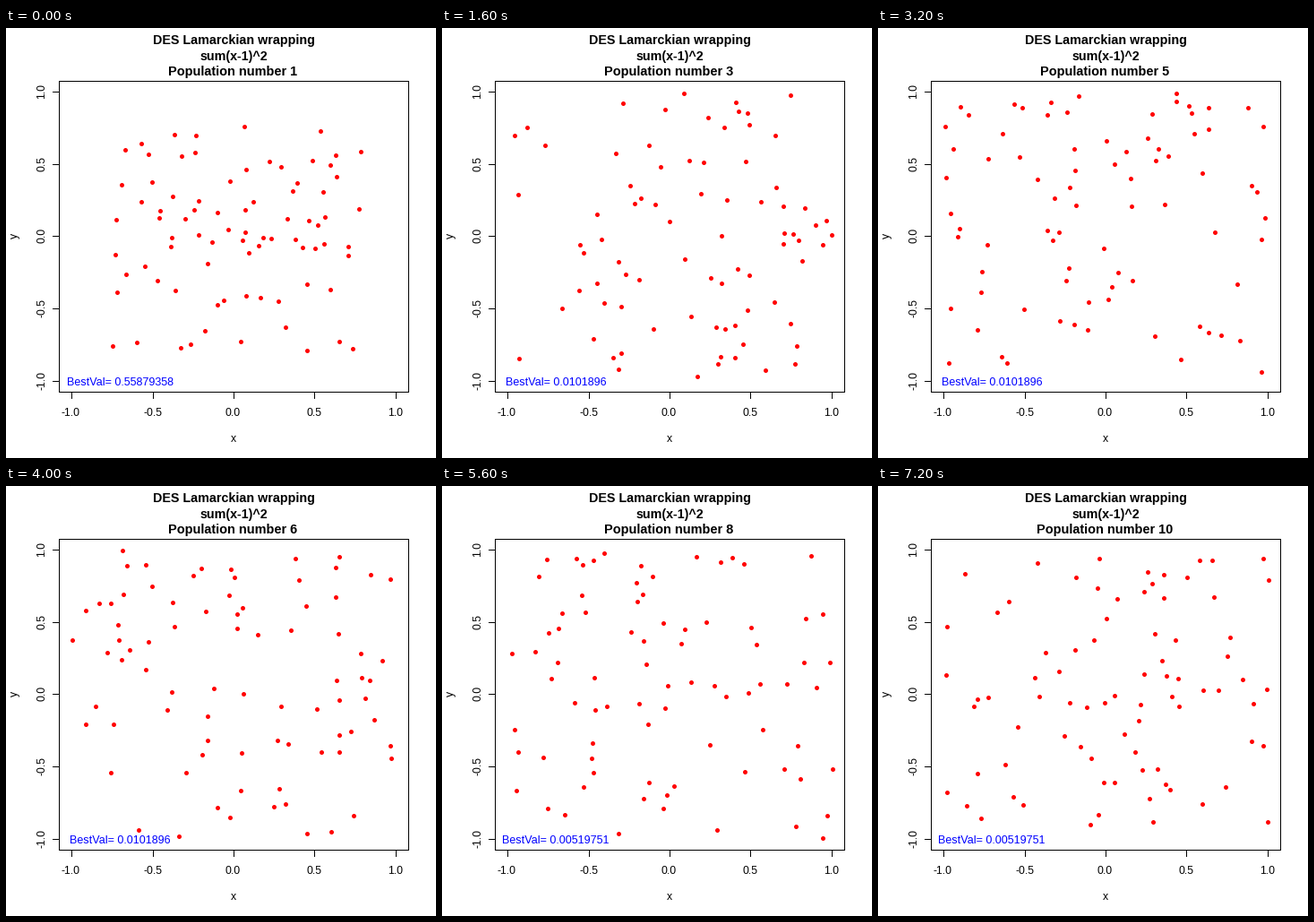
These frames come from a looping animation (480x480 px, 8000 ms). A matplotlib script:

```python
import math
import random

import matplotlib.pyplot as plt
from matplotlib.animation import FuncAnimation

SIZE = 480
PT = 0.72  # points per pixel at 100 dpi
FONT = "Liberation Sans"
LEFT, RIGHT, TOP, BOTTOM = 59, 449, 59, 406
COUNT = 80
GAP = 0.05  # least distance between individuals

# Population number at which each new best value appears.
RECORDS = {1: "0.55879358", 2: "0.11486806", 3: "0.0101896", 7: "0.00519751"}


def px_x(x):
    return round(254 + 181 * x)


def px_y(y):
    return round(232.5 - 161.2 * y)


def best_value(number):
    return RECORDS[max(n for n in RECORDS if n <= number)]


def population(number):
    """Scatter one population evenly, leaning slightly towards (1, 1)."""
    rng = random.Random(number)
    reach = 0.79 if number == 1 else 1.0

    def coord():
        return reach * (2 * rng.random() ** 0.9 - 1)

    points = []
    while len(points) < COUNT:
        point = coord(), coord()
        if all(math.dist(point, p) > GAP for p in points):
            points.append(point)
    return [px_x(x) + 0.5 for x, _ in points], [px_y(y) + 0.5 for _, y in points]


fig = plt.figure(figsize=(4.8, 4.8), dpi=100, facecolor="white")
ax = fig.add_axes([0, 0, 1, 1])
ax.set_xlim(0, SIZE)
ax.set_ylim(SIZE, 0)
ax.axis("off")


def line(xs, ys):
    # Snapping moves whole coordinates to the pixel centre.
    ax.plot(xs, ys, color="black", lw=PT, antialiased=False, snap=True,
            solid_capstyle="projecting", solid_joinstyle="miter")


def label(x, y, text, size=12.2, **style):
    return ax.text(x, y, text, fontsize=size * PT, family=FONT, ha="center",
                   va="baseline", rotation_mode="anchor", **style)


line((LEFT, RIGHT, RIGHT, LEFT, LEFT), (TOP, TOP, BOTTOM, BOTTOM, TOP))
for step in range(-2, 3):
    value = step / 2
    x, y = px_x(value), px_y(value)
    line((x, x), (BOTTOM, BOTTOM + 7))
    line((LEFT - 7, LEFT), (y, y))
    label(x - 0.5, 433, f"{value:.1f}")
    label(43, y - 0.5, f"{value:.1f}", rotation=90)
label(253.5, 462, "x")
label(13, 232, "y", rotation=90)

label(254, 18, "DES Lamarckian wrapping", 14.3, weight="bold")
label(254, 36, "sum(x-1)^2", 14.3, weight="bold")
title = label(253.5, 53, "", 14.5, weight="bold")
best = label(127, 399, "", 12.55, color="blue", zorder=4)
dots, = ax.plot([], [], "o", color="red", ms=5 * PT, mew=0)


def update(frame):
    number = frame + 1
    title.set_text(f"Population number {number}")
    best.set_text(f"BestVal= {best_value(number)}")
    dots.set_data(*population(number))
    return title, best, dots


anim = FuncAnimation(fig, update, frames=10, interval=800, repeat=True,
                     repeat_delay=0)
plt.show()
```
